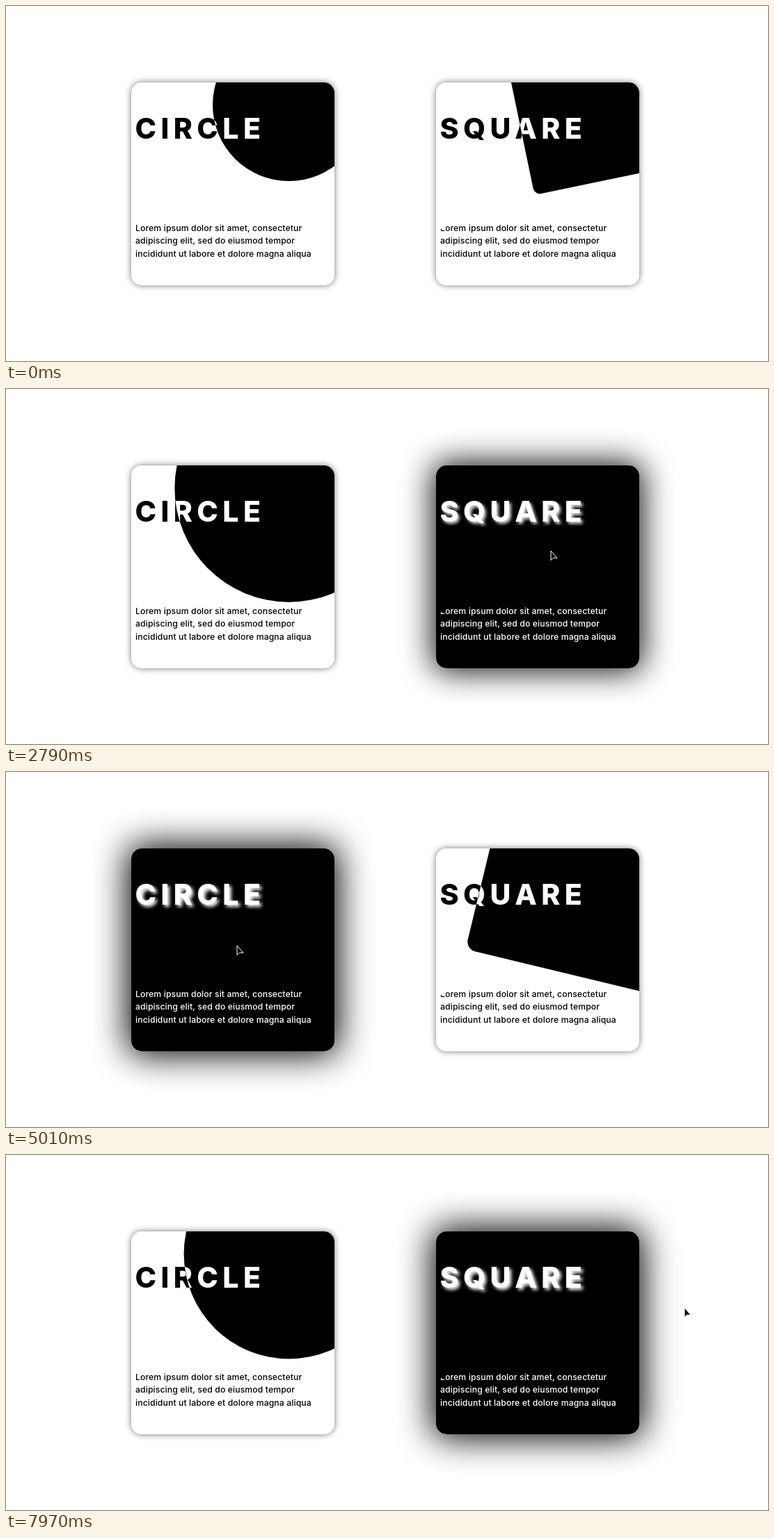
An HTML page that plays this animation: 1095 by 511 pixels, repeating every 8 s.

```html
<!DOCTYPE html>
<html lang="en">
<head>
<meta charset="utf-8">
<title>Shape cards</title>
<style>
  html, body { margin: 0; width: 100%; height: 100%; overflow: hidden; background: #fff; }
  body { position: relative; font-family: Inter, "Open Sans", sans-serif; }
  .card { position: absolute; top: 109.5px; width: 292px; height: 292px; border-radius: 15px; }
  .face { position: absolute; inset: 0; overflow: hidden; isolation: isolate; border-radius: 15px; background: #fff; }
  .shape { position: absolute; background: #000; }
  h1, p { position: absolute; margin: 0; color: #fff; white-space: nowrap; mix-blend-mode: difference; }
  h1 { left: 6px; top: 46px; font-size: 41px; line-height: 40px; font-weight: 800; letter-spacing: 6.5px; }
  p { left: 6.5px; top: 201.5px; font-size: 12.2px; line-height: 18.25px; font-weight: 500; letter-spacing: .12px; }
  #circle { left: 179.5px; }
  #square { left: 617.5px; }
  #circle .shape { border-radius: 50%; }
  #square .shape { border-radius: 10px; }
  /* the first letter is cut off at its top */
  #square p { clip-path: polygon(8px 0, 100% 0, 100% 100%, 0 100%, 0 10px, 8px 10px); }
  svg { position: absolute; left: 0; top: 0; width: 20px; height: 20px; overflow: visible; }
</style>
</head>
<body>
<div class="card" id="circle"><div class="face">
  <div class="shape"></div>
  <h1>CIRCLE</h1>
  <p>Lorem ipsum dolor sit amet, consectetur<br>adipiscing elit, sed do eiusmod tempor<br>incididunt ut labore et dolore magna aliqua</p>
</div></div>
<div class="card" id="square"><div class="face">
  <div class="shape"></div>
  <h1>SQUARE</h1>
  <p>Lorem ipsum dolor sit amet, consectetur<br>adipiscing elit, sed do eiusmod tempor<br>incididunt ut labore et dolore magna aliqua</p>
</div></div>
<svg id="cursor">
  <path id="arrow" d="M0 0V13.5L3.4 10.2H9Z" fill="#000" stroke="#fff"/>
  <path id="beam" d="M-3 -6H-1L0 -5L1 -6H3M0 -5V5M-3 6H-1L0 5L1 6H3" fill="none" stroke="#333"/>
</svg>
<script>
const LOOP = 8000, START = 840, PULSE = 3000, PULSE_AT = 1285;

// The pointer glides between these stops and may rest at them.
const STOPS = [
  { at: 1000, x: 1100, y: 100 },
  { at: 1800, x: 1017, y: 234, rest: 450 },
  { at: 2790, x: 783, y: 233, rest: 510 },
  { at: 3950, x: 512, y: 484 },
  { at: 4400, x: 403, y: 315 },
  { at: 4850, x: 332, y: 250, rest: 650 },
  { at: 6030, x: 514, y: 306 },
  { at: 6430, x: 700, y: 480 },
  { at: 6830, x: 929, y: 428 },
  { at: 7350, x: 800, y: 215 },
  { at: 7970, x: 975, y: 220 }
];

const $ = id => document.getElementById(id);
const lerp = (a, b, k) => a + (b - a) * k;
const clamp = x => Math.min(1, Math.max(0, x));
const smooth = x => x * x * (3 - 2 * x);

// CSS "ease": cubic-bezier(.25, .1, .25, 1)
function ease(x) {
  if (x <= 0) return 0;
  if (x >= 1) return 1;
  const bez = (a, b, u) => 3 * a * u * (1 - u) ** 2 + 3 * b * u * u * (1 - u) + u ** 3;
  let lo = 0, hi = 1;
  for (let i = 0; i < 22; i++) {
    const mid = (lo + hi) / 2;
    if (bez(.25, .25, mid) < x) lo = mid; else hi = mid;
  }
  return bez(.1, 1, lo);
}

function makeCard(id, spins, hovers) {
  const card = $(id);
  return {
    card, spins, hovers,
    shape: card.querySelector('.shape'),
    title: card.querySelector('h1'),
    text: card.querySelector('p')
  };
}

// spins: angle at the small, large and next small size
const cards = [
  makeCard('circle', [0, 0, 0], [[4410, 6090]]),
  makeCard('square', [-11.7, 20.5, 78.3], [[2510, 3660], [7080, 9000]])
];

const hoverLevel = (hovers, t, span) => hovers.reduce((sum, [from, to]) =>
  sum + ease((t - from) / span) * (1 - ease((t - to) / span)), 0);

function pulse(t, [small, large, next]) {
  if (t < START) return [1, small];
  const p = ((t - PULSE_AT + PULSE) % PULSE) / PULSE * 2;
  const k = ease(p % 1);
  return p < 1
    ? [lerp(1, 1.5, k), lerp(small, large, k)]
    : [lerp(1.5, 1, k), lerp(large, next, k)];
}

function drawCard({ card, shape, title, spins, hovers }, t) {
  const grow = hoverLevel(hovers, t, 1000);
  const glow = hoverLevel(hovers, t, 500);
  const half = lerp(109.5, 292, grow);
  const [scale, angle] = pulse(t, spins);
  shape.style.width = shape.style.height = half * 2 + 'px';
  shape.style.left = lerp(226.5, 122, grow) - half + 'px';
  shape.style.top = lerp(32.5, 90, grow) - half + 'px';
  shape.style.transform = `rotate(${angle}deg) scale(${scale})`;
  card.style.boxShadow =
    `0 0 ${lerp(10, 50, glow)}px ${lerp(0, 5, glow)}px rgba(0,0,0,${lerp(.55, 1, glow)})`;
  title.style.textShadow = glow > 0
    ? `${3 * glow}px ${3 * glow}px ${5 * glow}px rgba(255,255,255,${glow})` : 'none';
}

function cursorAt(t) {
  const i = STOPS.findLastIndex(stop => stop.at <= t);
  if (i < 0) return null;
  const a = STOPS[i], b = STOPS[i + 1] || a;
  const leave = a.at + (a.rest || 0);
  const k = b === a ? 0 : smooth(clamp((t - leave) / (b.at - leave)));
  return [lerp(a.x, b.x, k), lerp(a.y, b.y, k)];
}

const overText = (x, y) => cards.some(({ text }) => {
  const box = text.getBoundingClientRect();
  return x > box.left && x < box.right && y > box.top && y < box.bottom;
});

function drawCursor(t) {
  const pos = cursorAt(t);
  $('cursor').style.display = pos ? 'block' : 'none';
  if (!pos) return;
  const text = overText(...pos);
  $('arrow').style.display = text ? 'none' : 'inline';
  $('beam').style.display = text ? 'inline' : 'none';
  $('cursor').style.transform = `translate(${pos[0]}px, ${pos[1]}px)`;
}

const begin = performance.now();
function draw() {
  const t = (performance.now() - begin) % LOOP;
  cards.forEach(c => drawCard(c, t));
  drawCursor(t);
  requestAnimationFrame(draw);
}
draw();
</script>
</body>
</html>
```
